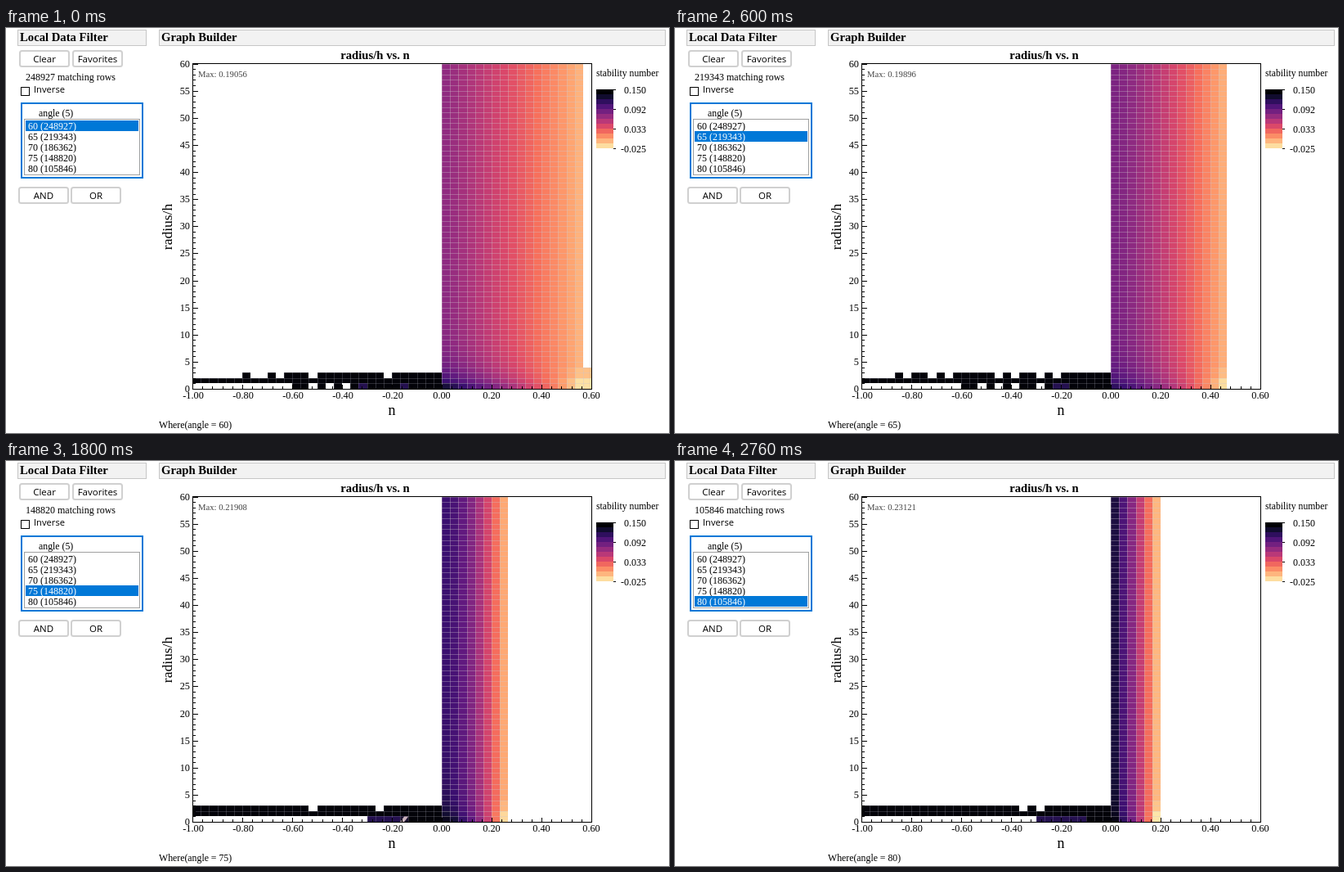
Animation of 811 by 495 pixels, one loop 3 s. Source, as an HTML page with a canvas:

```html
<!DOCTYPE html>
<html lang="en">
<head>
<meta charset="utf-8">
<title>Graph Builder</title>
<style>
  html, body { margin: 0; width: 100%; height: 100%; overflow: hidden; background: #fff; }
  canvas { display: block; }
</style>
</head>
<body>
<canvas id="stage" width="811" height="495"></canvas>
<script>
const ctx = document.getElementById('stage').getContext('2d');
const STEP_MS = 600;
const SERIF = '"Liberation Serif", "Times New Roman", serif';
const SANS = '"Open Sans", "Noto Sans", sans-serif';
const BLUE = '#0078d7';
const LEFT = 228, RIGHT = 716, TOP = 43.5, BOTTOM = 441;
const COL_W = (RIGHT - LEFT) / 48, ROW_H = (BOTTOM - TOP) / 60;
const ZERO_COL = 30;

// from, to, power: tone across the columns; dip: darkening near the base.
// upper and lower: occupied cells left of zero ('#' dark, 'p' purple).
const views = [
  { angle: 60, rows: 248927, max: '0.19056', cols: 17, from: .41, to: .84, power: 1.05, dip: .27,
    upper: '......#..#.###.########.######',
    lower: '............##.#.#.#p####p####' },
  { angle: 65, rows: 219343, max: '0.19896', cols: 14, from: .36, to: .83, power: 1.25, dip: .16,
    upper: '....#.##.#.#####.#.##.#.######',
    lower: '............##.#.#.##.#pp#####' },
  { angle: 70, rows: 186362, max: '0.2084', cols: 11, from: .27, to: .82, power: 1.3, dip: .17,
    upper: '.#############################',
    lower: '............##.#.##.#.##pp####' },
  { angle: 75, rows: 148820, max: '0.21908', cols: 8, from: .2, to: .82, power: 1.5, dip: .12,
    upper: '##############.#######.#######',
    lower: '.....................pppp/####' },
  { angle: 80, rows: 105846, max: '0.23121', cols: 6, from: .12, to: .85, power: 1.1, dip: .06,
    upper: '###################.#.########',
    lower: '.....................pppppp###' }
];

const palette = ['#000004', '#140e36', '#3b0f70', '#641a80', '#8c2981', '#b73779',
                 '#de4968', '#f7705c', '#fe9f6d', '#fecf92', '#fcfdbf']
  .map(hex => [1, 3, 5].map(i => parseInt(hex.slice(i, i + 2), 16)));

function tone(t) {
  const p = Math.min(.9999, Math.max(0, t)) * 10, i = Math.floor(p);
  const rgb = palette[i].map((v, k) => Math.round(v + (palette[i + 1][k] - v) * (p - i)));
  return `rgb(${rgb})`;
}

function rect(x, y, w, h, fill) {
  ctx.fillStyle = fill;
  ctx.fillRect(x, y, w, h);
}

function frame(x, y, w, h, color, width = 1) {
  ctx.strokeStyle = color;
  ctx.lineWidth = width;
  ctx.strokeRect(x, y, w, h);
}

function text(str, x, y, size = 12, { align = 'left', color = '#000', font = SERIF, bold = false } = {}) {
  ctx.font = `${bold ? 'bold ' : ''}${size}px ${font}`;
  ctx.textAlign = align;
  ctx.fillStyle = color;
  ctx.fillText(str, x, y);
}

function header(label, x, w) {
  rect(x, 2, w, 20, '#f2f2f2');
  frame(x + .5, 2.5, w - 1, 19, '#c6c6c6');
  text(label, x + 3, 16, 14.7, { bold: true });
}

function button(label, x, y) {
  ctx.beginPath();
  ctx.roundRect(x, y, 60, 19, 2.5);
  ctx.strokeStyle = '#d0d0d0';
  ctx.lineWidth = 2;
  ctx.stroke();
  text(label, x + 30, y + 14, 11.5, { align: 'center', font: SANS });
}

function drawFilter(view) {
  header('Local Data Filter', 14, 158);
  button('Clear', 17, 28);
  button('Favorites', 82, 28);
  text(`${view.rows} matching rows`, 24, 64);
  frame(18.5, 72.5, 10, 10, '#000');
  text('Inverse', 34, 79, 11.2, { font: SANS });
  frame(19, 92, 148, 91, BLUE, 2);
  text('angle (5)', 40, 108, 11.8);
  frame(22.5, 111.5, 141, 68, '#a0a0a0');
  views.forEach((item, i) => {
    const selected = item === view;
    if (selected) rect(24, 113 + 13 * i, 138, 13, BLUE);
    text(`${item.angle} (${item.rows})`, 27, 124 + 13 * i, 12, { color: selected ? '#fff' : '#000' });
  });
  button('AND', 16, 195);
  button('OR', 80, 195);
}

function cell(col, row, fill, line) {
  const x = Math.round(LEFT + col * COL_W), y = Math.round(BOTTOM - (row + 1) * ROW_H);
  const w = Math.round(LEFT + (col + 1) * COL_W) - x, h = Math.round(BOTTOM - row * ROW_H) - y;
  rect(x, y, w, h, fill);
  rect(x, y, 1, h, line);
  rect(x, y, w, 1, line);
}

function heat(view, col, row) {
  const u = Math.min(1, col / (view.cols - 1));
  const dip = view.dip * Math.exp(-row / 2.5) * (1 - u) + .03 * Math.exp(-row / 12) * (1 - u);
  const glow = (row < 2 ? .1 : row < 4 ? .03 : 0) * u ** 6;
  return tone(view.from + (view.to - view.from) * u ** view.power - dip + glow);
}

function drawStrip(mask, row) {
  [...mask].forEach((mark, col) => {
    if (mark === '#') cell(col, row, '#030309', 'rgba(190,190,205,.22)');
    if (mark === 'p') cell(col, row, '#24104f', 'rgba(190,190,205,.2)');
    if (mark === '/') {
      const x = LEFT + col * COL_W, y = BOTTOM - ROW_H;
      cell(col, row, '#19102f', 'rgba(190,190,205,.2)');
      ctx.beginPath();
      ctx.moveTo(x, BOTTOM);
      ctx.lineTo(x + 5, y);
      ctx.lineTo(x + 10, y);
      ctx.lineTo(x + 5, BOTTOM);
      ctx.fillStyle = '#cbb3bd';
      ctx.fill();
    }
  });
}

function drawAxes() {
  frame(LEFT + .5, 43.5, RIGHT - LEFT, 398, '#000');
  for (let v = 0; v <= 60; v++) {
    const y = Math.round(BOTTOM - v * ROW_H), major = v % 5 === 0;
    rect(LEFT, y, major ? 7 : 4, 1, '#000');
    if (major) text(v, 225, y + 4, 12.3, { align: 'right' });
  }
  for (let i = 0; i <= 40; i++) {
    const x = Math.round(LEFT + i * (RIGHT - LEFT) / 40), major = i % 5 === 0;
    rect(x, major ? 436 : 438, 1, major ? 6 : 4, '#000');
    if (major) {
      const value = (i - 25) / 25;
      text(value.toFixed(2), x + (value < 0 ? 1 : 0), 453, 12.3, { align: 'center' });
    }
  }
  text('n', 472, 473, 18, { align: 'center' });
  ctx.save();
  ctx.translate(203, 243);
  ctx.rotate(-Math.PI / 2);
  text('radius/h', 0, 0, 17.5, { align: 'center' });
  ctx.restore();
}

function drawLegend() {
  text('stability number', 722, 59, 11.7);
  for (let i = 0; i < 12; i++) {
    const y = Math.round(75 + i * 6);
    rect(722, y, 21, 6, tone(.93 * i / 11));
  }
  ['0.150', '0.092', '0.033', '-0.025'].forEach((label, i) => {
    rect(743, 75 + 24 * i, 3, 1, '#000');
    text(label, 783, 80 + 24 * i, 12, { align: 'right' });
  });
}

function drawGraph(view) {
  header('Graph Builder', 187, 620);
  text('radius/h vs. n', 451.5, 38, 14.7, { align: 'center', bold: true });
  const line = 'rgba(205,195,205,.34)';
  for (let col = 0; col < view.cols; col++) {
    for (let row = 0; row < 60; row++) cell(ZERO_COL + col, row, heat(view, col, row), line);
  }
  if (view.angle === 60) {
    for (let row = 0; row < 4; row++) cell(ZERO_COL + 17, row, heat(view, 17, row), line);
  }
  drawStrip(view.upper, 2);
  drawStrip('#'.repeat(30), 1);
  drawStrip(view.lower, 0);
  drawAxes();
  text(`Max: ${view.max}`, 235, 60, 10.7, { color: '#444' });
  text(`Where(angle = ${view.angle})`, 187, 489, 11.8);
  drawLegend();
}

function render(now) {
  const view = views[Math.floor(now / STEP_MS) % views.length];
  rect(0, 0, 811, 495, '#fff');
  drawFilter(view);
  drawGraph(view);
}

let start;
function tick(now) {
  start ??= now;
  render(now - start);
  requestAnimationFrame(tick);
}
render(0);
requestAnimationFrame(tick);
</script>
</body>
</html>
```
